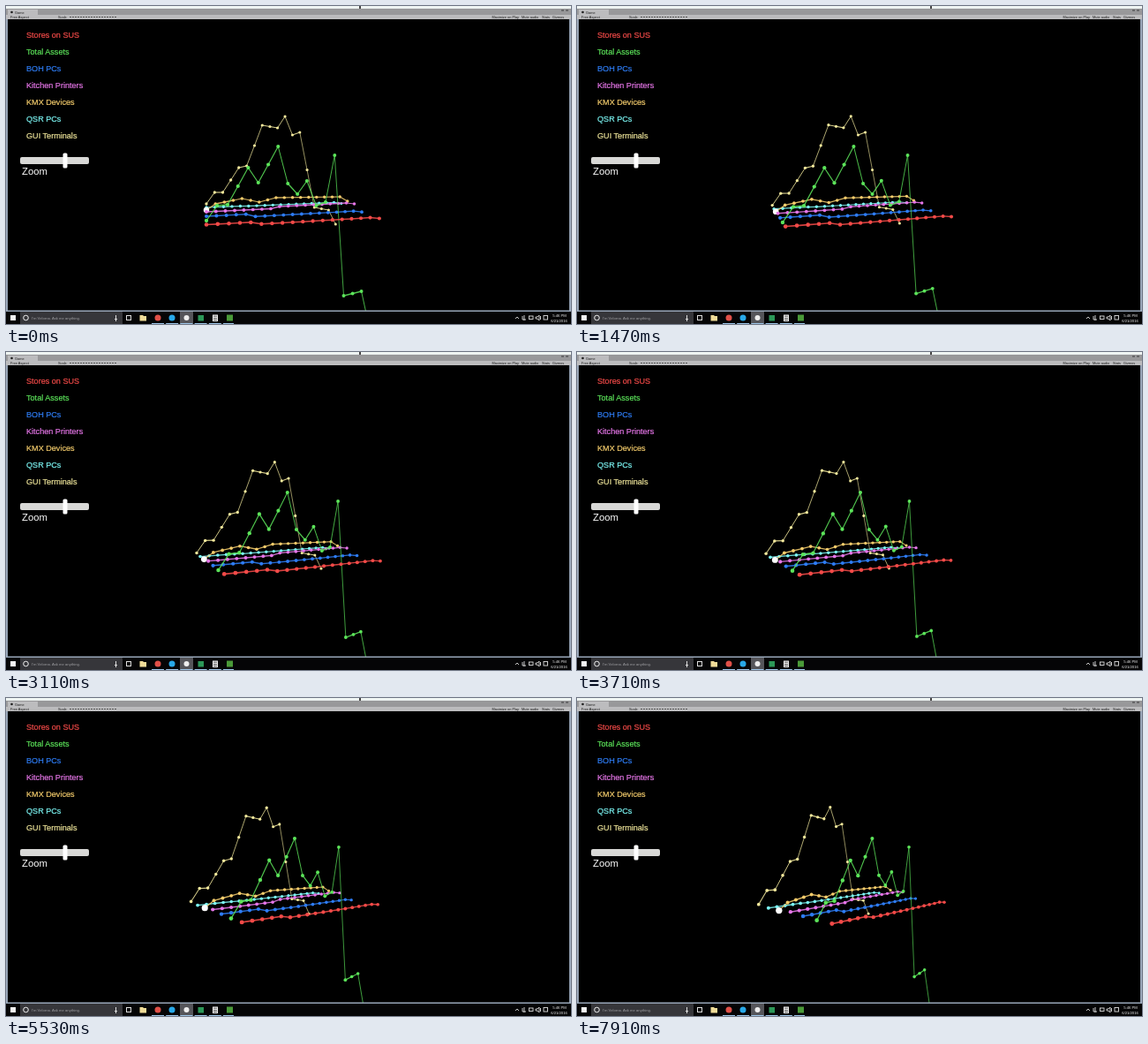
An HTML page with a canvas that plays this animation: 640 px wide and 360 px high, repeating every 8 s.

```html
<!DOCTYPE html>
<html lang="en">
<head>
<meta charset="utf-8">
<title>Rotating 3D line chart</title>
<style>
  html, body { margin: 0; width: 100%; height: 100%; overflow: hidden; background: #000; }
  canvas, svg { position: absolute; left: 0; top: 0; width: 640px; height: 360px; }
  svg { font-family: "Liberation Sans", Arial, sans-serif; }
  .legend { font-size: 9.1px; stroke-width: .2px; }
  .tiny { font-size: 4.2px; }
  .toolbar { font-size: 3.9px; }
</style>
</head>
<body>
<canvas id="chart" width="640" height="360"></canvas>
<svg viewBox="0 0 640 360">
  <!-- editor window frame -->
  <rect width="640" height="3" fill="#eef4f2"/>
  <rect y="3" width="640" height="7" fill="#98989a"/>
  <rect x="2" y="4" width="34" height="6" fill="#bcbcbe"/>
  <rect y="10" width="640" height="5" fill="#bcbcbe"/>
  <rect x="400" width="2" height="3" fill="#444"/>
  <path d="M0 15H2V344.500H638V15H640V346H0Z" fill="#98a6b8"/>
  <g class="toolbar" fill="#1c1c1c">
    <circle cx="6.500" cy="7" r="1.300"/>
    <text x="10" y="8.600">Game</text>
    <text x="5" y="14">Free Aspect</text>
    <text x="59" y="14">Scale</text>
    <path d="M72 12.500H126" stroke="#555" stroke-dasharray="2 1"/>
    <text x="550.500" y="14">Maximize on Play</text>
    <text x="584" y="14">Mute audio</text>
    <text x="607" y="14">Stats</text>
    <text x="619" y="14">Gizmos</text>
    <path d="M629 5H632M634 5H637" stroke="#1c1c1c" stroke-width=".8"/>
  </g>

  <g class="legend" id="legend"></g>

  <rect x="16" y="171" width="78" height="8" rx="2" fill="#d8d8d6"/>
  <rect x="64.500" y="166.500" width="5" height="17" rx="1.500" fill="#fff"/>
  <text x="18" y="191" font-size="11.300" fill="#fff">Zoom</text>

  <!-- taskbar -->
  <rect y="346" width="640" height="14" fill="#050506"/>
  <rect x="16" y="346" width="116" height="14" fill="#36363a"/>
  <rect x="5" y="350" width="6" height="6" fill="#f4f4f4"/>
  <circle cx="22.500" cy="353" r="2.800" fill="none" stroke="#eee"/>
  <text class="tiny" x="29" y="354.700" fill="#a0a0a4">I'm Velorna. Ask me anything.</text>
  <path d="M124.500 350V354M123 354.500H126M124.500 354V357" stroke="#ddd" fill="none"/>
  <rect x="136.500" y="350.500" width="5" height="5" fill="none" stroke="#ddd"/>
  <path d="M151.500 350H155L156 351H159V356.500H151.500Z" fill="#f0dc98"/>
  <circle cx="172" cy="353" r="3.500" fill="#e05048"/>
  <circle cx="188" cy="353" r="3.500" fill="#28a8e8"/>
  <rect x="197" y="346" width="15" height="14" fill="#55555a"/>
  <circle cx="204.500" cy="353" r="3" fill="#eee"/>
  <rect x="217.500" y="350" width="6.500" height="6.500" fill="#2c9858"/>
  <rect x="234" y="349.500" width="6" height="7.500" fill="#f0f0f0"/>
  <path d="M235 351.200H239M235 353.500H239M235 355.500H239" stroke="#333" stroke-width=".8"/>
  <rect x="250" y="349.500" width="7" height="7" fill="#4a9a38"/>
  <path d="M165 359.500H258" stroke="#9cc4e8" stroke-dasharray="14 2.200"/>
  <g fill="none" stroke="#ddd" stroke-width=".9">
    <path d="M577 354L579 352L581 354M585 351V355H589M587 350V356"/>
    <rect x="592.500" y="351" width="4.500" height="3.500"/>
    <path d="M600 352H602L604 350V356L602 354H600ZM605.500 351V355"/>
    <rect x="609" y="350.500" width="4.500" height="4.500"/>
  </g>
  <g class="tiny" fill="#f4f4f4" text-anchor="middle">
    <text x="627" y="351.700">5:46 PM</text>
    <text x="626.500" y="358">6/21/2016</text>
  </g>
</svg>
<script>
const LOOP = 8000, LAST_STEP = 171;
const START_ANGLE = 13.1, SWEEP = 31.1;
const FOCAL = 400, DISTANCE = 1.252, SHIFT = -0.0162, HORIZON = 165;
const COLUMNS = 18, COLUMN = 0.0315, ROW = 0.065, MARKER_ROW = 4;

// Both rules give the screen y of a column in the opening pose.
// A steady climb with one jump on the way and a small drop at the end.
const trend = (start, rate, jumpAt, jump) => i =>
  start - rate * i + (i >= jumpAt ? jump : 0) + (i === COLUMNS - 1 ? 1.5 : 0);

// Straight runs between [column, y] corners.
const path = (...corners) => i => {
  const k = Math.max(1, corners.findIndex(([column]) => column >= i));
  const [c0, y0] = corners[k - 1], [c1, y1] = corners[k];
  return y0 + (y1 - y0) * (i - c0) / (c1 - c0);
};

// Nearest series first.
const series = [
  { name: "Stores on SUS", color: "#f24a48", height: trend(247.5, 0.65, 5, 2.5) },
  { name: "Total Assets", color: "#5ce45a", height: path([0, 243], [1, 226], [2, 225], [4, 183], [5, 200], [7, 159], [8, 201],
    [9, 213], [10, 198], [11, 226], [12, 222], [13, 169], [14, 328], [16, 323], [17, 368]) },
  { name: "BOH PCs", color: "#2e7cf4", height: trend(238, 0.55, 5, 3) },
  { name: "Kitchen Printers", color: "#e676e8", height: trend(233, 0.5, 8, -2) },
  { name: "KMX Devices", color: "#f4cc6c", height: path([0, 231], [1, 224], [4, 218], [6, 222], [8, 217], [16, 216], [17, 221]) },
  { name: "QSR PCs", color: "#7cf6f4", height: trend(228, 0.37, 5, 0.3) },
  { name: "GUI Terminals", color: "#f2e89c", height: path([0, 224], [1, 211], [2, 211], [4, 183], [5, 181], [7, 135],
    [9, 138], [10, 125], [11, 146], [12, 143], [14, 228], [16, 231], [17, 247]) }
];

const legend = document.getElementById("legend");
series.forEach(({ name, color }, i) => {
  const label = document.createElementNS("http://www.w3.org/2000/svg", "text");
  label.setAttribute("x", 23);
  label.setAttribute("y", 35.6 + 19.1 * i);
  label.setAttribute("fill", color);
  label.setAttribute("stroke", color);
  label.textContent = name;
  legend.append(label);
});

const ctx = document.getElementById("chart").getContext("2d");

// Position of a grid point after turning the grid about its centre.
function place(column, row, degrees) {
  const a = degrees * Math.PI / 180;
  const x = (column - (COLUMNS - 1) / 2) * COLUMN, z = (row - 3) * ROW;
  const depth = DISTANCE + x * Math.sin(a) + z * Math.cos(a);
  const across = SHIFT + x * Math.cos(a) - z * Math.sin(a);
  return { x: 320 + FOCAL * across / depth, depth };
}

// Steps come in threes: two short ones and a long hold, every 140 ms.
function stepAt(t) {
  if (t < 30) return 0;
  const u = t - 30, rest = u % 140;
  return 1 + 3 * Math.floor(u / 140) + Math.min(2, Math.floor(rest / 20));
}

function dot(p, radius) {
  ctx.beginPath();
  ctx.arc(p.x, p.y, radius, 0, 2 * Math.PI);
  ctx.fill();
}

function drawSeries({ color, height }, row, progress) {
  const angle = START_ANGLE + SWEEP * progress;
  const points = Array.from({ length: COLUMNS }, (_, i) => {
    const { x, depth } = place(i, row, angle);
    const scale = place(i, row, START_ANGLE).depth / depth * (1 + 0.015 * progress);
    return { x, depth, y: HORIZON + (height(i) - HORIZON) * scale };
  });
  ctx.strokeStyle = ctx.fillStyle = color;
  ctx.globalAlpha = 0.88;
  points.slice(1).forEach((p, i) => {
    const q = points[i];
    const flatness = (p.x - q.x) / Math.hypot(p.x - q.x, p.y - q.y);
    ctx.lineWidth = (0.9 + 0.75 * flatness) / p.depth;
    ctx.beginPath();
    ctx.moveTo(q.x, q.y);
    ctx.lineTo(p.x, p.y);
    ctx.stroke();
  });
  ctx.globalAlpha = 1;
  points.forEach(p => dot(p, 2.3 / p.depth));
  return points[0];
}

function draw(now) {
  const progress = stepAt(now % LOOP) / LAST_STEP;
  ctx.fillStyle = "#000";
  ctx.fillRect(0, 0, 640, 360);
  for (let row = series.length - 1; row >= 0; row--) {
    const first = drawSeries(series[row], row, progress);
    if (row === MARKER_ROW) {
      ctx.fillStyle = "#fff";
      dot(first, 4.1 / first.depth);
    }
  }
  requestAnimationFrame(draw);
}
requestAnimationFrame(draw);
</script>
</body>
</html>
```
